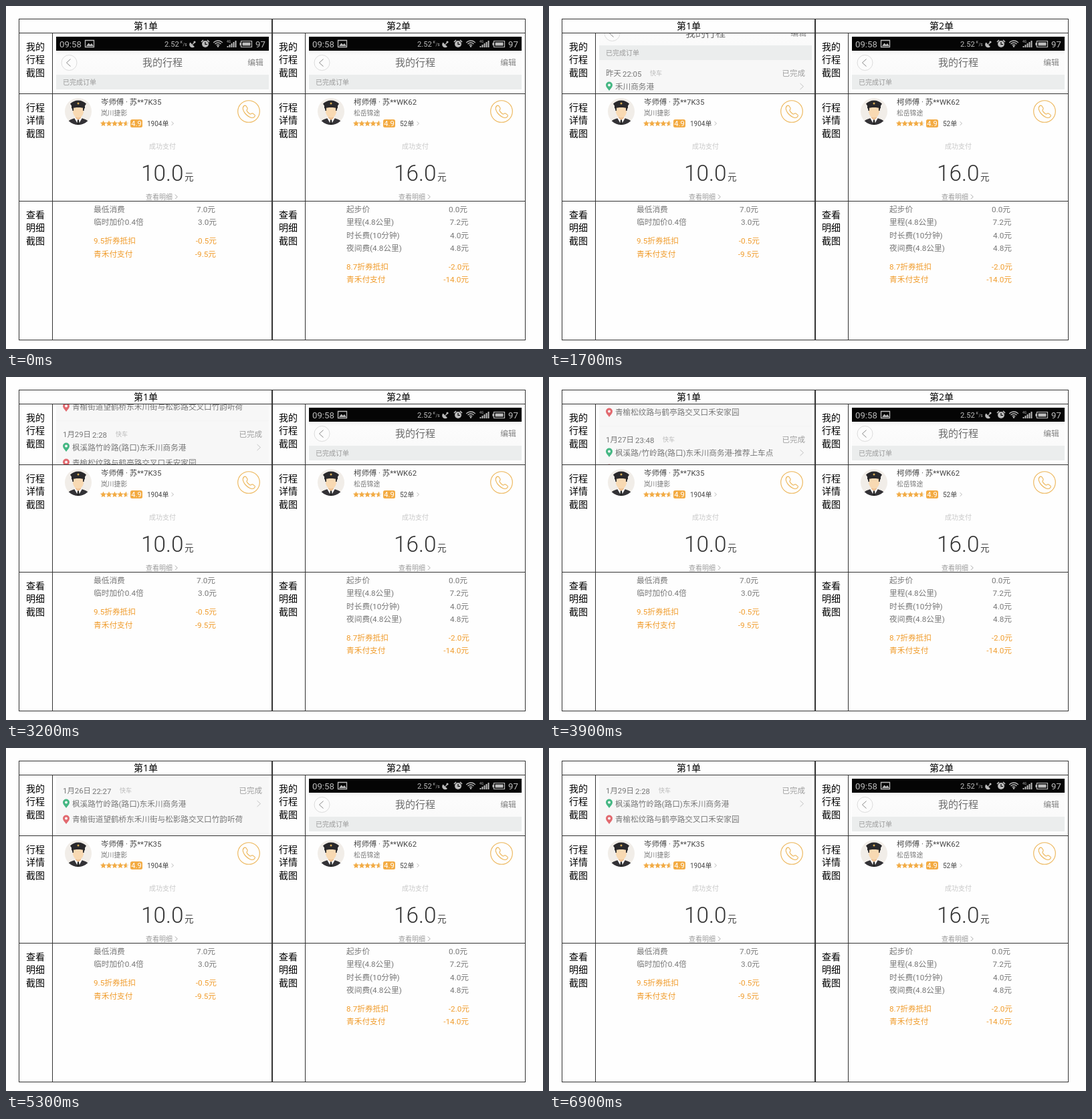
An HTML page with a canvas for the animation above (8 s loop, 803 by 514 pixels).

```html
<!DOCTYPE html>
<html lang="zh-CN">
<head>
<meta charset="utf-8">
<style>
html, body { margin: 0; width: 803px; height: 514px; overflow: hidden; background: #fefefe; }
canvas { display: block; }
</style>
</head>
<body>
<canvas id="stage"></canvas>
<script>
const W = 803, H = 514, LOOP = 8000, PANEL_STEP = 378;
const GRAY = '#777', ORANGE = '#f09c2c', AMBER = '#f3ab43', STATUS = '#bcbcbc';
const canvas = document.getElementById('stage');
const ratio = window.devicePixelRatio || 1;
canvas.width = W * ratio;
canvas.height = H * ratio;
canvas.style.width = W + 'px';
canvas.style.height = H + 'px';
const ctx = canvas.getContext('2d');

// Scroll offset of the trip list: [ms, px], linear between points.
const SCROLL = [
  [900, 0], [1400, 31], [1500, 31], [1700, 44], [1900, 44], [3200, 143],
  [3900, 219], [4700, 297], [5200, 344], [5900, 269], [6900, 165]
];

const HARBOUR = '枫溪路竹岭路(路口)东禾川商务港';
const GARDEN = '青榆街道望鹤桥东禾川街与松影路交叉口竹韵听荷';
const TRIPS = [
  { day: '昨天', time: '22:05', timeX: 110, tagX: 151, from: '禾川商务港', to: GARDEN },
  { day: '1月29日', time: '2:28', timeX: 129, tagX: 164, from: HARBOUR, to: '青榆松纹路与鹤亭路交叉口禾安家园' },
  { day: '1月27日', time: '23:48', timeX: 129, tagX: 170, from: '枫溪路/竹岭路(路口)东禾川商务港-推荐上车点', to: GARDEN },
  { day: '1月26日', time: '22:27', timeX: 129, tagX: 170, from: HARBOUR, to: GARDEN }
];
const TRIP_TOP = 145, TRIP_STEP = 84;

const ORDERS = [
  {
    title: '第1单', driver: '岑师傅 · 苏**7K35', car: '岚川捷影', rides: '1904单', arrowX: 249, price: '10.0',
    items: [
      ['最低消费', '7.0元', 305, 313], ['临时加价0.4倍', '3.0元', 324, 315],
      ['9.5折券抵扣', '-0.5元', 352, 315, ORANGE], ['青禾付支付', '-9.5元', 371.5, 314, ORANGE]
    ]
  },
  {
    title: '第2单', driver: '柯师傅 · 苏**WK62', car: '松岳锦途', rides: '52单', arrowX: 238, price: '16.0',
    items: [
      ['起步价', '0.0元', 305, 312], ['里程(4.8公里)', '7.2元', 324, 313.5],
      ['时长费(10分钟)', '4.0元', 343.5, 314], ['夜间费(4.8公里)', '4.8元', 363, 314],
      ['8.7折券抵扣', '-2.0元', 391, 315, ORANGE], ['青禾付支付', '-14.0元', 410, 314, ORANGE]
    ]
  }
];

// y is the vertical middle of the glyphs.
function text(str, x, y, size, color, align = 'left', weight = 400, latin = 'Roboto') {
  ctx.font = `${weight} ${size}px ${latin}, "Noto Sans CJK SC", "Noto Sans CJK JP", sans-serif`;
  ctx.textAlign = align;
  ctx.fillStyle = color;
  ctx.fillText(str, x, y + size * 0.37);
}

function rect(x, y, w, h, color) {
  ctx.fillStyle = color;
  ctx.fillRect(x, y, w, h);
}

function circle(x, y, r, fill) {
  ctx.beginPath();
  ctx.arc(x, y, r, 0, Math.PI * 2);
  ctx.fillStyle = fill;
  ctx.fill();
}

function stroke(color, width = 1) {
  ctx.strokeStyle = color;
  ctx.lineWidth = width;
  ctx.stroke();
}

function path(d, fill, line, width) {
  const shape = new Path2D(d);
  if (fill) {
    ctx.fillStyle = fill;
    ctx.fill(shape);
  }
  if (line) {
    ctx.strokeStyle = line;
    ctx.lineWidth = width || 1;
    ctx.stroke(shape);
  }
}

function at(x, y, draw) {
  ctx.save();
  ctx.translate(x, y);
  draw();
  ctx.restore();
}

function clipped(x, y, w, h, draw) {
  ctx.save();
  ctx.beginPath();
  ctx.rect(x, y, w, h);
  ctx.clip();
  draw();
  ctx.restore();
}

function chevron(x, y, w, h, color, width = 1) {
  ctx.beginPath();
  ctx.moveTo(x - w / 2, y - h / 2);
  ctx.lineTo(x + w / 2, y);
  ctx.lineTo(x - w / 2, y + h / 2);
  stroke(color, width);
}

function statusBar() {
  rect(75, 46, 318, 21, '#050505');
  text('09:58', 80, 57, 13.2, STATUS);
  path('M118.5 51.5H131.5V61.5H118.5Z', null, STATUS, 1.3);
  path('M120 60L123.5 55.5 126 58 128 56 131 60Z', STATUS);
  text('2.52', 237, 56.5, 11.2, STATUS);
  text('K', 260.5, 54, 5.5, STATUS);
  text('/s', 264.5, 57.5, 6.5, STATUS);
  path('M275.5 54.5A4.5 4.5 0 1 0 282 61Z', STATUS);
  path('M279 57.5L282 54.5', null, STATUS, 1.3);
  circle(282, 54, 1.6, STATUS);
  circle(298, 57, 5, STATUS);
  path('M298 54V57.5H301', null, '#050505', 1.2);
  path('M292 54L295 51M301 51L304 54', null, STATUS, 1.7);
  for (const r of [3, 6, 9]) {
    ctx.beginPath();
    ctx.arc(317, 61, r, -Math.PI * 0.77, -Math.PI * 0.23);
    stroke(STATUS, 1.3);
  }
  circle(317, 60.5, 1.3, STATUS);
  text('4G', 330, 53, 5, STATUS);
  for (let i = 0; i < 5; i++) rect(330.5 + i * 3, 60 - i * 2, 2, 2 + i * 2, STATUS);
  path('M351.5 52.5H367.5V61.5H351.5Z', null, STATUS, 1.2);
  rect(353.5, 54.5, 12, 5, STATUS);
  rect(349.5, 55, 2, 4, STATUS);
  text('97', 373, 57, 13.2, STATUS);
}

function phoneHeader() {
  const shade = ctx.createLinearGradient(0, 67, 0, 103);
  shade.addColorStop(0, '#f4f4f4');
  shade.addColorStop(0.2, '#fcfcfc');
  shade.addColorStop(1, '#fafafa');
  rect(75, 67, 318, 36, shade);
  statusBar();
  circle(94.5, 85, 11.5, '#fcfcfc');
  stroke('#dcdcdc');
  chevron(93.5, 85, -6, 11, '#8a8a8a');
  text('我的行程', 234, 84.5, 15, '#6c6c6c', 'center');
  text('编辑', 373, 85, 11.8, '#808080', 'center');
  rect(75, 103, 318, 22, '#ebeded');
  text('已完成订单', 85, 114.5, 10, '#999');
}

function pin(x, y, color) {
  at(x, y, () => {
    path('M0 7C-2 4-5 1.5-5-1.5A5 5 0 0 1 5-1.5C5 1.5 2 4 0 7Z', color);
    circle(0, -1.5, 2, '#f7f7f7');
  });
}

function trip({ day, time, timeX, tagX, from, to }, y) {
  text(day, 85, y, 11.4, GRAY);
  text(time, timeX, y + 0.3, 11.4, GRAY);
  text('快车', tagX, y, 9, '#bbb');
  text('已完成', 383, y, 11.5, '#a0a0a0', 'right');
  pin(90, y + 19, '#45b783');
  text(from, 99, y + 19.5, 11.6, GRAY);
  chevron(378, y + 19.5, 5, 9, '#c4c4c4');
  pin(90, y + 43, '#e2696f');
  text(to, 99, y + 43, 11.6, GRAY);
  rect(75, y + 63, 318, 1, '#f3f3f3');
}

function tripScreen(scroll) {
  const [top, bottom] = scroll > 0 ? [41, 131] : [46, 125];
  clipped(75, top, 318, bottom - top, () => {
    rect(75, top, 318, bottom - top, '#f7f7f7');
    ctx.translate(0, -scroll);
    phoneHeader();
    TRIPS.forEach((item, i) => trip(item, TRIP_TOP + i * TRIP_STEP));
  });
}

function avatar() {
  circle(108, 158, 20, '#f1ede8');
  ctx.save();
  ctx.clip();
  path('M91 180C91 172 96 170 103 168H113C120 170 125 172 125 180Z', '#333236');
  path('M102 167.5L108 178 114 167.5Z', '#fff');
  path('M104 161H112V168L108 171 104 168Z', '#eebf91');
  path('M107 170.5H109L110 178H106Z', '#222');
  path('M100 152H116V157.5C116 163.5 112 167.5 108 167.5S100 163.5 100 157.5Z', '#f8d9b2');
  path('M98.5 151H101V157H99.5ZM115 151H117.5L116.5 157H115Z', '#2c2a2b');
  path('M98 153.5V149.5L96 146.5C99 143.5 103 141.5 108 141.5S117 143.5 120 146.5L118 149.5V153.5C113 151.5 103 151.5 98 153.5Z', '#29282b');
  circle(108, 146, 1.5, '#d9ad55');
  ctx.restore();
}

function star(x, y, r, color) {
  ctx.beginPath();
  for (let i = 0; i < 10; i++) {
    const angle = -Math.PI / 2 + i * Math.PI / 5, radius = i % 2 ? r * 0.45 : r;
    ctx.lineTo(x + Math.cos(angle) * radius, y + Math.sin(angle) * radius);
  }
  ctx.closePath();
  ctx.fillStyle = color;
  ctx.fill();
}

function stars(color) {
  for (let i = 0; i < 5; i++) star(145.5 + i * 8.5, 176.3, 4.7, color);
}

function callButton() {
  circle(363, 158, 16.3, '#fefefe');
  stroke('#ecb455', 1.1);
  path('M355.5 150C357 148.5 358.5 149 359.5 150.5L361 153C361.8 154.5 359.5 155.5 360 156.8C361 159 363 161 365 162C366.3 162.5 367.3 160 368.8 161L371.3 162.6C372.8 163.6 372.7 165 371.2 166.4C368.5 169 363 166.5 359 162.5C355 158.5 352.7 152.8 355.5 150Z', null, '#ecb455', 1.1);
}

function details({ driver, car, rides, arrowX, price }) {
  avatar();
  text(driver, 142, 144, 11.4, '#484848');
  text(car, 142, 160, 9.8, '#777');
  stars('#eee3d0');
  clipped(140, 170, 40.5, 14, () => stars(AMBER));
  ctx.beginPath();
  ctx.roundRect(186, 170, 18, 12, 2.5);
  ctx.fillStyle = AMBER;
  ctx.fill();
  text('4.9', 195, 176, 11, '#fff', 'center');
  text(rides, 211, 176, 10, '#484848');
  chevron(arrowX, 176, 3, 5.5, '#bbb');
  callButton();
  text('成功支付', 234, 210, 10, '#c8c8c8', 'center');
  text(price, 202, 249.6, 33.3, '#333', 'left', 300);
  text('元', 267, 256.3, 13.5, '#444');
  text('查看明细', 209, 286, 10, '#999');
  chevron(254.5, 286, 3.5, 7, '#aaa');
}

function label(lines, y) {
  lines.forEach((line, i) => text(line, 44, y + i * 19.2, 14, '#000', 'center'));
}

function grid() {
  for (const x of [19, 398]) rect(x, 19, 1, 482, '#333');
  rect(69, 40, 1, 461, '#333');
  for (const y of [19, 40, 131, 292, 500]) rect(19, y, 380, 1, '#333');
}

function panel(order, scroll) {
  text(order.title, 209, 30, 14, '#000', 'center', 400, '"Open Sans"');
  label(['我的', '行程', '截图'], 61);
  label(['行程', '详情', '截图'], 152);
  label(['查看', '明细', '截图'], 313);
  tripScreen(scroll);
  details(order);
  for (const [name, value, y, right, color = GRAY] of order.items) {
    text(name, 131, y, 11.7, color);
    text(value, right, y, 11.7, color, 'right');
  }
  grid();
}

function scrollAt(ms) {
  const t = Math.floor(ms / 100) * 100;
  const next = SCROLL.findIndex(([time]) => time >= t);
  if (next === 0) return 0;
  if (next < 0) return SCROLL[SCROLL.length - 1][1];
  const [t0, y0] = SCROLL[next - 1], [t1, y1] = SCROLL[next];
  return Math.round(y0 + (y1 - y0) * (t - t0) / (t1 - t0));
}

function render(now) {
  ctx.setTransform(ratio, 0, 0, ratio, 0, 0);
  rect(0, 0, W, H, '#fefefe');
  const scroll = scrollAt(now % LOOP);
  ORDERS.forEach((order, i) => at(i * PANEL_STEP, 0, () => panel(order, i ? 0 : scroll)));
}

const start = performance.now();
function tick() {
  render(performance.now() - start);
  requestAnimationFrame(tick);
}
tick();
</script>
</body>
</html>
```
